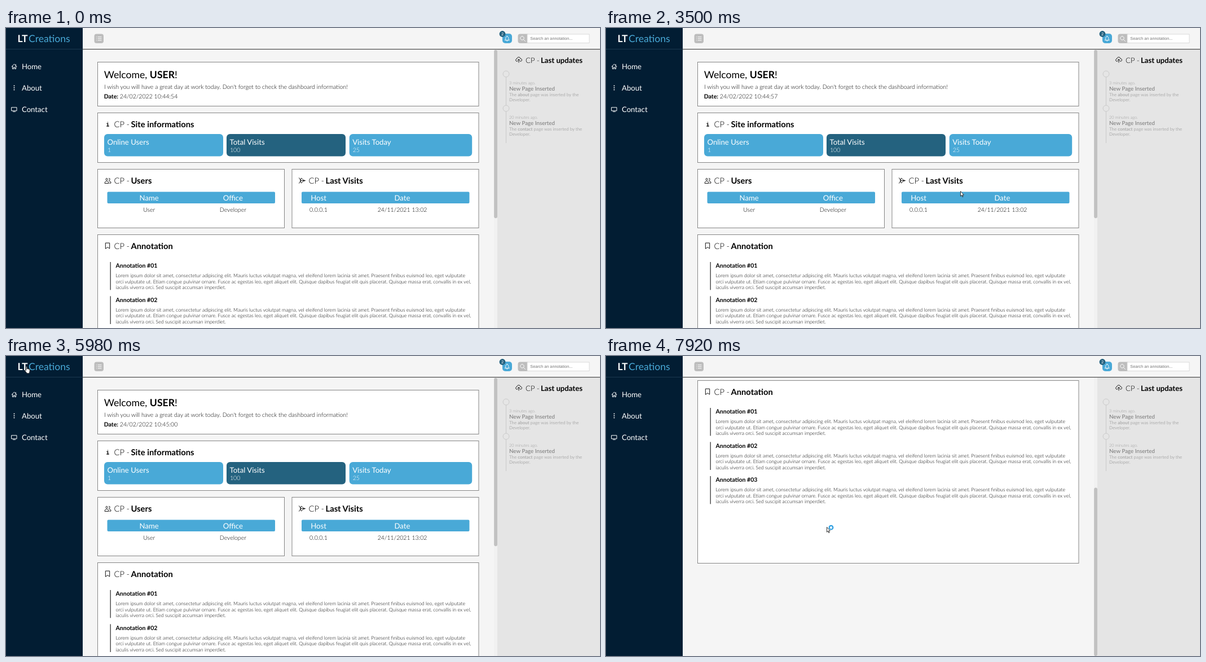
Write an HTML page that moves like this. It is 1053 by 532 pixels and loops after 8 s.

```html
<!DOCTYPE html>
<html lang="en">
<head>
<meta charset="utf-8">
<title>Control panel</title>
<style>
html, body { margin: 0; width: 100%; height: 100%; overflow: hidden; background: #f5f5f5; }
svg { display: block; width: 1053px; height: 532px; font-family: Lato, sans-serif; text-rendering: geometricPrecision; }
.line { fill: none; stroke: #111; stroke-width: 1; stroke-linejoin: round; stroke-linecap: round; }
.light { stroke: #fff; }
</style>
</head>
<body>
<svg id="stage" viewBox="0 0 1053 532"></svg>
<script>
const BLUE = '#49a9d7', DEEP = '#24627f', LOOP = 8000;
const LOREM = [
  'Lorem ipsum dolor sit amet, consectetur adipiscing elit. Mauris luctus volutpat magna, vel eleifend lorem lacinia sit amet. Praesent finibus euismod leo, eget vulputate',
  'orci vulputate ut. Etiam congue pulvinar ornare. Fusce ac egestas leo, eget aliquet elit. Quisque dapibus feugiat elit quis placerat. Quisque massa erat, convallis in ex vel,',
  'iaculis viverra orci. Sed suscipit accumsan imperdiet.'
];

const text = (x, y, s, size = 10.53, weight = 300, fill = '#000', more = '') =>
  `<text x="${x}" y="${y}" font-size="${size}" font-weight="${weight}" fill="${fill}" ${more}>${s}</text>`;
const mid = (x, y, s, size, weight, fill) => text(x, y, s, size, weight, fill, 'text-anchor="middle"');
const rect = (x, y, w, h, fill, r = 0, more = '') =>
  `<rect x="${x}" y="${y}" width="${w}" height="${h}" fill="${fill}" rx="${r}" ${more}/>`;
const panel = (x, y, w, h) => rect(x, y, w, h, '#fff', 0, 'stroke="#858585"');
const icon = (x, y, d, cls = '') => `<path class="line ${cls}" transform="translate(${x} ${y})" d="${d}"/>`;
const heading = (x, y, s, size = 14.74, gap = 30) => text(x, y, 'CP -', size) + text(x + gap, y, s, size, 700);

const ICONS = {
  home: 'M.5 5.5 5 1l4.5 4.5M2 4.5v5h2V6.700h2V9.500h2v-5M7.700 1.500v1.800',
  tv: 'M.5.8h9v6h-9zM3 8.300h4',
  people: 'M4 1a1.700 1.700 0 1 0 .01 0M.5 9.500c0-5 7-5 7 0zM8 1a1.700 1.700 0 1 1 0 3.500M8.500 5.800c2 0 3 1.500 3 3.700H9',
  plane: 'M.6.8 3 4.600v2L.6 10.300M3 5.600h8.500M3 4.600 4.500 1l3.500 3.500 3 1.100-3 1L4.500 10 3 6.600',
  bookmark: 'M.7.7h7v10L4.200 8.200.7 10.700z',
  cloud: 'M3.500 8H3C-.3 8-.2 4 2.600 3.800 3-.3 8.600-.2 9 3.400c3.300 0 3.200 4.600.2 4.600H8.500M6 10V4.500M4.200 6.200 6 4.500l1.800 1.700',
  bell: 'M1 7.800c1.200-1 1-2 1.200-3.600C2.600.6 6.800.6 7.200 4.200c.2 1.600 0 2.600 1.200 3.600zM3.700 9.300c.3.800 1.700.8 2 0M4.700 1.400V.7',
  lens: 'M4 .6a3.300 3.300 0 1 0 .01 0M6.500 6.500l3 3',
  list: 'M3.500 1h6M3.500 4h6M3.500 7h6M1 1h.1M1 4h.1M1 7h.1'
};

function card(x, w, fill, label, value) {
  return rect(x, 188, w, 39.500, fill, 6) + text(x + 5.500, 206.500, label, 13.16, 400, '#fff') +
    text(x + 6, 219.800, value, 10.53, 300, '#fff');
}

function table(x, w, cols) {
  return rect(x, 290.500, w, 20.500, BLUE, 2) + cols.map(([cx, head, cell]) =>
    mid(cx, 306, head, 13.16, 400, '#fff') + mid(cx, 326, cell)).join('');
}

function note(x, i) {
  const y = 415 + i * 60.500;
  return rect(x + 22, y, 1.400, 49.500, '#444') + text(x + 32, y + 10.300, 'Annotation #0' + (i + 1), 10.53, 700) +
    LOREM.map((s, n) => text(x + 32, y + 27 + n * 10.500, s, 8.77)).join('');
}

function mainArea(g) {
  const { x, w, half, v, cards, table: tw, cols } = g;
  return panel(x, 60.500, w, 78) +
    text(x + 11.200, 89, 'Welcome, <tspan font-weight="700">USER</tspan>!', 17.600, 400) +
    text(x + 11.500, 108, "I wish you will have a great day at work today. Don't forget to check the dashboard information!") +
    text(x + 11.200, 125, 'Date:', 10.53, 700) + text(x + 39.300, 125, '', 10.53, 300, '#000', 'class="date"') +
    panel(x, 150.500, w, 88) +
    `<path d="M${x + 16} 169.500h2v4.500m-2.200 0h4.400m-2.600-6.800h.8" fill="none" stroke="#111" stroke-width="1.500"/>` +
    heading(x + 29, 176, 'Site informations') +
    card(cards[0], cards[3], BLUE, 'Online Users', '1') +
    card(cards[1], cards[3], DEEP, 'Total Visits', '100') +
    card(cards[2], cards[4], BLUE, 'Visits Today', '25') +
    panel(x, 250.500, half, 104) + icon(x + 12, 265.500, ICONS.people) + heading(x + 29, 276, 'Users') +
    table(x + 17, tw, [[cols[0], 'Name', 'User'], [cols[1], 'Office', 'Developer']]) +
    panel(v, 250.500, half, 104) + icon(v + 12, 265, ICONS.plane) + heading(v + 29.500, 276, 'Last Visits') +
    table(v + 17, tw, [[cols[2], 'Host', '0.0.0.1'], [cols[3], 'Date', '24/11/2021 13:02']]) +
    panel(x, 366.500, w, 324) + icon(x + 13.500, 380.500, ICONS.bookmark) + heading(x + 29, 392.200, 'Annotation') +
    [0, 1, 2].map(i => note(x, i)).join('');
}

function update(x, y, when, page, wide) {
  const who = 'page was inserted by the';
  return `<circle cx="${x - 5.500}" cy="${y}" r="5.400" fill="#e5e5e5" stroke="#cacaca"/>` +
    text(x, y + 18.500, when + ' minutes ago.', 7.370, 300, '#999') +
    text(x, y + 29, 'New Page Inserted', 9.800, 400, '#777') +
    text(x, y + 39.300, `The <tspan font-weight="700">${page}</tspan> ${who}${wide ? ' Developer.' : ''}`, 7.900, 400, '#adadad') +
    (wide ? '' : text(x, y + 48.800, 'Developer.', 7.900, 400, '#adadad'));
}

function topBar(menu, dx) {
  return rect(0, 0, 1053, 37, '#f5f5f5') + rect(0, 37, 1053, 1.200, '#4a4a4a') +
    rect(menu, 10.500, 16.500, 16.500, '#bdbdbd', 4) + icon(menu + 3, 14.800, ICONS.list, 'light') +
    `<g transform="translate(${dx})">` + rect(880, 10, 17, 17, BLUE, 5) + icon(883.600, 13.500, ICONS.bell, 'light') +
    `<circle cx="880" cy="10.500" r="5.400" fill="${DEEP}"/>` + mid(880, 13, '2', 7, 400, '#fff') +
    rect(907.500, 10.500, 20, 16.500, '#bdbdbd', 4) + icon(911, 14, ICONS.lens, 'light') +
    rect(924, 11, 110, 15.500, '#fff', 0, 'stroke="#d2d2d2" stroke-width=".8"') +
    text(929.300, 21.300, 'Search an annotation...', 7.250, 400, '#757575', 'font-family="Liberation Sans, Arial, sans-serif"') + '</g>';
}

function page(id, g) {
  const { side, wide } = g;
  return `<g id="${id}">` + rect(0, 0, 1053, 532, '#f5f5f5') +
    `<g clip-path="url(#view)"><g class="scroll">${mainArea(g)}</g></g>` +
    rect(side - 6, 38, 6, 494, '#f1f1f1') + rect(side - 5.800, 38.700, 5.800, 298.500, '#c1c1c1', 2.900, 'class="thumb"') +
    rect(side, 38, 1053 - side, 494, '#e5e5e5') +
    icon(g.title - 18, 51, ICONS.cloud) + heading(g.title, 62, 'Last updates', 13.16, 27) +
    rect(g.news - 6.100, 77, 1.200, wide ? 108 : 127, '#cdcdcd') +
    update(g.news, 81.500, 3, 'about', wide) + update(g.news, wide ? 133.200 : 142.500, 20, 'contact', wide) +
    topBar(g.menu, g.shift) + (wide ? '' : sidebar()) + '</g>';
}

function sidebar() {
  const link = (y, s) => text(28, y, s, 13.16, 400, '#fff');
  return rect(0, 0, 136, 532, '#021d33') +
    '<path d="M0 37.500h136" stroke="#34556c" stroke-dasharray="1 1"/>' +
    text(20.500, 25.200, 'LT', 17.550, 700, '#fff') + text(40, 25.200, 'Creations', 17.550, 400, BLUE) +
    icon(9.500, 63, ICONS.home, 'light') + link(73.300, 'Home') +
    [102.500, 106, 109.500].map(y => `<circle cx="14.500" cy="${y}" r="1" fill="#fff"/>`).join('') + link(111.300, 'About') +
    icon(9.500, 140, ICONS.tv, 'light') + link(149.300, 'Contact');
}

const stage = document.getElementById('stage');
stage.innerHTML = '<clipPath id="view"><path d="M0 38.200h1053V532H0z"/></clipPath>' +
  page('open', { x: 162.500, w: 675.500, half: 331, v: 507, cards: [174, 391, 608.700, 211, 217.500], table: 297.500,
    cols: [253.700, 402.300, 554, 702.500], side: 871, title: 921, news: 892, menu: 156.500, shift: 0 }) +
  page('closed', { x: 82.200, w: 671.300, half: 328.800, v: 424.700, cards: [93.500, 309.300, 525.500, 209.500, 216], table: 295,
    cols: [172.500, 320, 471.200, 618.500], side: 844, title: 907.500, news: 865, menu: 22, shift: -2.700, wide: true }) +
  '<g id="status">' + rect(0, 520.500, 129.500, 12, '#000') +
  text(1, 529, 'localhost/Portfolio/control-pane_template/', 6.280, 400, '#fff', 'font-family="Open Sans, sans-serif"') + '</g>' +
  `<g id="cursor" fill="#fff" stroke="#222" stroke-width=".9" stroke-linejoin="round">
    <path id="arrow" d="M.5.5v8.800l2-1.900 1.400 3.200 1.200-.5-1.400-3.100h2.700z"/>
    <path id="hand" d="M2.600 7.500V1.300c0-1 1.600-1 1.600 0V5c.2-.8 1.600-.7 1.700.2.2-.6 1.600-.5 1.700.4.3-.5 1.500-.3 1.500.6v2.600c0 1.800-.9 2.600-1 4H4C3.500 10.900 1.200 9.300.6 7.700c-.3-.9.8-1.400 2-.2z"/>
    <path id="beam" d="M-1.500-5h3M0-5V5M-1.500 5h3" stroke="#777" stroke-width=".7"/>
    <circle id="busy" cx="8" cy="1.200" r="3.300" stroke="#2f9fe0" stroke-width="2.200"/>
  </g>`;

// Screen refreshes: first change, last change, number of changes
const STEPS = [[0, 0, 1], [70, 70, 1], [220, 220, 1], [460, 1200, 9], [1290, 1870, 8], [2300, 2300, 1], [2550, 3170, 8],
  [3330, 4090, 9], [4200, 4290, 2], [4450, 4530, 2], [4700, 5470, 10], [5550, 5550, 1], [5980, 5980, 1],
  [6140, 6880, 9], [6970, 7070, 2], [7470, 7780, 4]];
const MOVES = [[70, 874, 468], [220, 676, 383], [460, 680, 370], [800, 800, 190], [1200, 888, 36], [1290, 883, 12],
  [1500, 881, 6], [1870, 877, 12], [2300, 878, 13], [2550, 886, 40], [2860, 960, 300], [3170, 1011, 516],
  [3330, 920, 462], [3520, 628, 289], [3800, 330, 115], [4090, 180, 34], [4200, 168, 24], [4290, 162, 18],
  [4530, 163, 18], [4700, 150, 19], [5290, 24, 20], [5470, 32, 18], [5550, 33, 18], [5980, 33, 18],
  [6140, 52, 36], [6510, 331, 242], [6880, 386, 292], [6970, 390, 296], [7070, 390, 297], [7470, 391, 303]];
const SCROLL = [[6880, 0], [6970, 2], [7070, 7], [7470, 110], [7573, 220], [7677, 300], [7780, 323]];
const SHAPES = [[0, ''], [70, 'arrow'], [1290, 'hand'], [2550, 'arrow'], [4200, 'hand'], [4530, 'arrow'], [5290, 'hand'],
  [6140, 'arrow'], [6970, 'beam'], [7470, 'arrow busy']];

const last = (list, t) => list.filter(k => k[0] <= t).pop();

function snap(t) {
  const [from, to, n] = last(STEPS, t);
  if (n < 2) return from;
  const gap = (to - from) / (n - 1);
  return from + gap * Math.min(n - 1, Math.floor((t - from) / gap + .25));
}

function between(keys, t) {
  const a = last(keys, t) || keys[0], b = keys.find(k => k[0] > t) || a;
  const p = a === b || t < a[0] ? 0 : (t - a[0]) / (b[0] - a[0]);
  return a.slice(1).map((v, i) => v + (b[i + 1] - v) * p);
}

const $ = id => document.getElementById(id);
const each = (sel, fn) => stage.querySelectorAll(sel).forEach(fn);
const show = (el, on) => { el.style.display = on ? '' : 'none'; };

function draw(now) {
  const t = now % LOOP, s = snap(t);
  const closed = t >= 4450 && t < 5980;
  show($('open'), !closed);
  show($('closed'), closed);
  show($('status'), t >= 6140 && t < 6700);

  const sec = 54 + Math.floor((t + 190) / 1000);
  const clock = `24/02/2022 10:${sec < 60 ? 44 : 45}:${String(sec % 60).padStart(2, '0')}`;
  each('.date', el => { el.textContent = clock; });

  const [y] = between(SCROLL, s);
  each('.scroll', el => el.setAttribute('transform', `translate(0 ${-Math.round(y)})`));
  each('.thumb', el => el.setAttribute('transform', `translate(0 ${y * .603})`));

  const shape = last(SHAPES, s)[1].split(' ');
  for (const el of $('cursor').children) show(el, shape.includes(el.id));
  $('cursor').setAttribute('transform', `translate(${between(MOVES, s).map(Math.round)})`);
  requestAnimationFrame(draw);
}
draw(performance.now());
</script>
</body>
</html>
```
